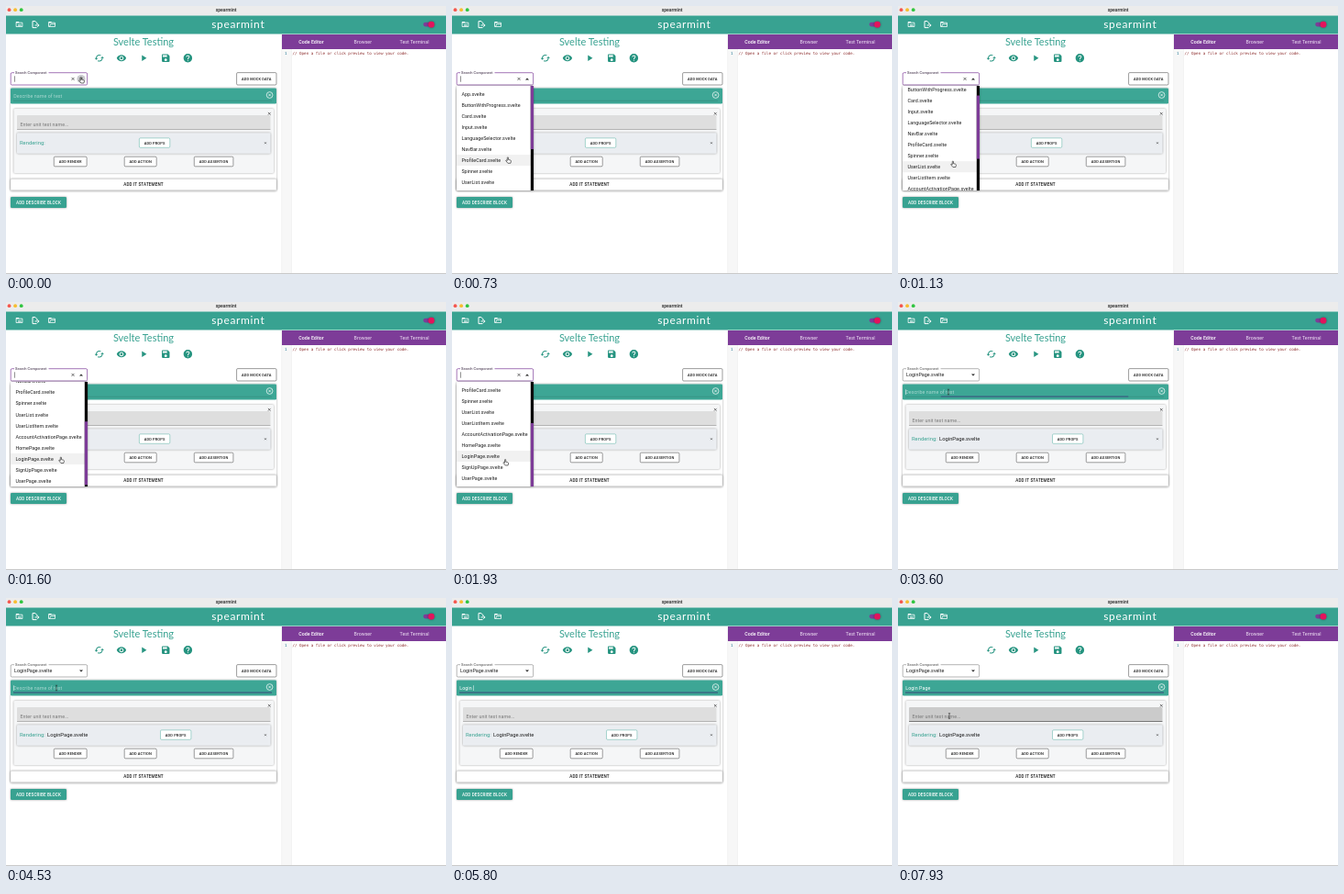
These frames come from a looping animation (480 px wide and 292 px high, 8000 ms). An HTML page:

```html
<!DOCTYPE html>
<html lang="en">
<head>
<meta charset="utf-8">
<title>Test builder</title>
<style>
html, body { margin: 0; width: 100%; height: 100%; overflow: hidden; background: #fff; }
svg { display: block; width: 100vw; height: 100vh; }
text { font-family: Roboto, sans-serif; white-space: pre; }
.body { font-size: 5.33px; letter-spacing: .05px; }
.btn { font-weight: 500; letter-spacing: .0286em; text-anchor: middle; }
.brand { font-family: Lato, sans-serif; }
.tab { font-size: 5.3px; text-anchor: middle; fill: #f1e4f6; }
.code { font-family: "DejaVu Sans Mono", "Liberation Mono", monospace; font-size: 4.24px; }
.shadow { filter: drop-shadow(0 .7px .9px rgba(0,0,0,.38)); }
</style>
</head>
<body>
<svg id="stage" viewBox="0 0 480 292" preserveAspectRatio="none">
  <defs>
    <clipPath id="listClip"><rect x="5" y="87" width="81" height="114"/></clipPath>
  </defs>
  <rect width="480" height="292" fill="#fff"/>
</svg>
<script>
const LOOP = 8000, ROW = 12.05, THUMB = 69, MAX_SCROLL = 6 * ROW;
const TEAL = '#38a291', PURPLE = '#7d3c98', INK = '#1c1c1c';
const stage = document.getElementById('stage');

function add(tag, attrs, parent = stage) {
  const node = document.createElementNS('http://www.w3.org/2000/svg', tag);
  set(node, attrs);
  parent.appendChild(node);
  return node;
}
function set(node, attrs) {
  for (const key in attrs) node.setAttribute(key, attrs[key]);
}
function show(node, on) { node.setAttribute('visibility', on ? 'visible' : 'hidden'); }
function box(x, y, w, h, fill, more = {}, parent) {
  return add('rect', { x, y, width: w, height: h, fill, ...more }, parent);
}
function label(x, y, str, more = {}, parent) {
  const node = add('text', { x, y, fill: INK, ...more }, parent);
  node.textContent = str;
  return node;
}
function line(d, stroke, width, more = {}, parent) {
  return add('path', { d, stroke, 'stroke-width': width, fill: 'none', ...more }, parent);
}
function icon(cx, cy, scale, d, fill, parent) {
  return add('path', { d, fill, transform: `translate(${cx} ${cy}) scale(${scale}) translate(-12 -12)` }, parent);
}
function cross(cx, cy, r, stroke, width, parent) {
  return line(`M${cx - r} ${cy - r}l${2 * r} ${2 * r}m0 ${-2 * r}l${-2 * r} ${2 * r}`, stroke, width, {}, parent);
}
function button(x, y, w, h, str, size = 4, stroke = '#222', parent) {
  box(x, y, w, h, '#fff', { rx: 1.2, stroke, 'stroke-width': .45 }, parent);
  label(x + w / 2, y + h / 2 + size * .36, str, { class: 'btn', 'font-size': size }, parent);
}

// window chrome
box(0, 0, 480, 10.5, '#ececec');
['#f4574f', '#f7bd2f', '#2fc53f'].forEach((c, i) =>
  add('circle', { cx: 3.5 + 6.6 * i, cy: 4.2, r: 1.9, fill: c }));
label(240, 6.2, 'spearmint', { 'font-size': 5, 'font-weight': 700, 'text-anchor': 'middle', fill: '#3c3c3c' });
box(0, 10.5, 480, 20, TEAL);
label(253.3, 24, 'spearmint', { class: 'brand', 'font-size': 12, 'letter-spacing': .65, 'text-anchor': 'middle', fill: '#fff' });

// header icons
const FOLDER = 'M20 6h-8l-2-2H4c-1.1 0-1.99.9-1.99 2L2 18c0 1.1.9 2 2 2h16c1.1 0 2-.9 2-2V8c0-1.1-.9-2-2-2zm0 12H4V8h16v10z';
icon(14.5, 20, .38, FOLDER, '#fff');
line('M13 20.3h3.6M13 21.7h3.6', '#fff', .7);
line('M33.5 23.6h-4.5v-7h3l1.7 1.8v1.4', '#fff', 1);
line('M31.5 21h4.4m-1.6-1.7l1.8 1.7l-1.8 1.7', '#fff', .9);
icon(50, 20, .38, FOLDER, '#fff');
line('M47.5 22.6l1.2-2.8h5', '#fff', .8);
box(455.2, 17.7, 11.5, 4.8, PURPLE, { rx: 2.4 });
add('circle', { cx: 464, cy: 20.2, r: 3.4, fill: '#e3135c', class: 'shadow' });

// right panel
box(300.7, 30.5, .6, 261.5, '#dcdcdc');
box(301, 31, 179, 16, PURPLE);
label(333, 41, 'Code Editor', { class: 'tab', style: 'fill:#fff;font-weight:500' });
label(389.3, 41, 'Browser', { class: 'tab' });
label(445.5, 41, 'Test Terminal', { class: 'tab' });
box(301.3, 47, 10, 244, '#f7f7f7');
box(311, 47, .4, 244, '#e2e2e2');
label(304, 53, '1', { class: 'code', fill: '#237893' });
label(312.4, 53, '// Open a file or click preview to view your code.', { class: 'code', fill: '#8b2a2a' });

// left panel heading and tools
label(150, 42.5, 'Svelte Testing', { class: 'brand', 'font-size': 11, 'text-anchor': 'middle', fill: TEAL });
[
  'M19 8l-4 4h3c0 3.31-2.69 6-6 6-1.01 0-1.97-.25-2.8-.7l-1.46 1.46C8.97 19.54 10.43 20 12 20c4.42 0 8-3.58 8-8h3l-4-4zM6 12c0-3.31 2.69-6 6-6 1.01 0 1.97.25 2.8.7l1.46-1.46C15.03 4.46 13.57 4 12 4c-4.42 0-8 3.58-8 8H1l4 4 4-4H6z',
  'M12 4.5C7 4.5 2.73 7.61 1 12c1.73 4.39 6 7.5 11 7.5s9.27-3.11 11-7.5c-1.73-4.39-6-7.5-11-7.5zM12 17c-2.76 0-5-2.24-5-5s2.24-5 5-5 5 2.24 5 5-2.24 5-5 5zm0-8c-1.66 0-3 1.34-3 3s1.34 3 3 3 3-1.34 3-3-1.34-3-3-3z',
  'M8 5v14l11-7z',
  'M17 3H5c-1.11 0-2 .9-2 2v14c0 1.1.89 2 2 2h14c1.1 0 2-.9 2-2V7l-4-4zm-5 16c-1.66 0-3-1.34-3-3s1.34-3 3-3 3 1.34 3 3-1.34 3-3 3zm3-10H5V5h10v4z',
  'M12 2C6.48 2 2 6.48 2 12s4.48 10 10 10 10-4.48 10-10S17.52 2 12 2zm1 17h-2v-2h2v2zm2.07-7.75l-.9.92C13.45 12.9 13 13.5 13 15h-2v-.5c0-1.1.45-2.1 1.17-2.83l1.24-1.26c.37-.36.59-.86.59-1.41 0-1.1-.9-2-2-2s-2 .9-2 2H8c0-2.21 1.79-4 4-4s4 1.79 4 4c0 .88-.36 1.68-.93 2.25z'
].forEach((d, i) => icon(101.8 + 24.15 * i, 56.8, .47, d, '#269480'));

// component search
const searchBox = box(5.2, 72.7, 83.4, 13.3, '#fff', { rx: 1.3 });
box(9, 71.5, 37.5, 2.5, '#fff');
const searchLabel = label(10, 74, 'Search Component', { 'font-size': 4, 'letter-spacing': .035 });
const picked = label(9, 81.3, 'LoginPage.svelte', { class: 'body' });
const searchCaret = box(9, 76.3, .5, 6.4, '#222');
const clear = cross(73, 79.4, 1.5, '#333', .7);
const ripple = add('circle', { cx: 82, cy: 79.5, r: 4.6, fill: '#c9c9cd' });
const arrow = add('path', { d: 'M-2-.9h4l-2 2z', fill: '#222' });
button(251.6, 72.6, 43.4, 13.4, 'ADD MOCK DATA');

// describe block
box(5, 89.5, 290, 112, '#fff', { rx: 1.3, class: 'shadow' });
box(5, 89.5, 290, 17, '#3da695', { rx: 1.3 });
const hint = label(8.3, 99.8, 'Describe name of test', { class: 'body', fill: '#fff', 'fill-opacity': .55 });
const typed = label(8.3, 99.8, '', { class: 'body', fill: '#fff' });
const typeCaret = box(8.3, 95.2, .5, 5.8, '#fff');
box(8, 102.9, 282, .4, '#2b786c');
const underline = box(8, 102.6, 282, .8, '#3c3f7d');
add('circle', { cx: 287.6, cy: 97, r: 3.4, fill: 'none', stroke: '#fff', 'stroke-width': .7 });
cross(287.6, 97, 1.3, '#fff', .7);

// test card
box(8.5, 112, 283.5, 70, '#f5f6f7', { rx: 1.3, class: 'shadow' });
cross(287.3, 117.3, 1.4, '#222', .6);
const field = box(12, 119, 276.5, 16, '#dedede', { rx: 1 });
const fieldLine = box(12, 134.5, 276.5, .5, '#888');
label(15.5, 131.4, 'Enter unit test name...', { class: 'body', fill: '#777' });
box(12, 138.3, 276.5, 22.5, '#eff2f6', { rx: 1.3, class: 'shadow', 'fill-opacity': .95 });
label(15, 151.2, 'Rendering:', { 'font-size': 5.83, fill: TEAL });
const rendered = label(45, 151.2, 'LoginPage.svelte', { 'font-size': 5.83 });
const props = add('g', {});
button(145.4, 143.9, 33.4, 10.4, 'ADD PROPS', 4, '#45a898', props);
cross(283, 149.3, .9, '#333', .6);
button(52.3, 164.2, 35.8, 10.6, 'ADD RENDER');
button(129.2, 164.2, 35, 10.6, 'ADD ACTION');
button(205.3, 164.2, 42.6, 10.6, 'ADD ASSERTION');

box(5, 188.6, 290, 12, '#fff', { rx: 1.2, stroke: '#d2d2d2', 'stroke-width': .4, class: 'shadow' });
label(150, 196.3, 'ADD IT STATEMENT', { class: 'btn', 'font-size': 4.6 });
box(5, 208, 61, 12, TEAL, { rx: 1.3, class: 'shadow' });
label(35.5, 215.7, 'ADD DESCRIBE BLOCK', { class: 'btn', 'font-size': 4.6, fill: '#fff' });
box(0, 291, 480, 1, '#c9c9c9');

// dropdown list
const popup = add('g', {});
box(5, 87, 84, 114, '#fff', { class: 'shadow', rx: .8 }, popup);
const clipped = add('g', { 'clip-path': 'url(#listClip)' }, popup);
const list = add('g', {}, clipped);
const hover = box(5, 0, 81, ROW, '#f1f1f1', {}, list);
('App ButtonWithProgress Card Input LanguageSelector NavBar ProfileCard Spinner UserList ' +
 'UserListItem AccountActivationPage HomePage LoginPage SignUpPage UserPage').split(' ')
  .forEach((name, i) => label(10.4, 97.6 + ROW * i, name + '.svelte', { class: 'body' }, list));
box(85.8, 87, 3.2, 114, '#0a0a0a', {}, popup);
const thumb = box(85.8, 87, 3.2, THUMB, PURPLE, {}, popup);

// mouse pointers, hot spot at the origin
const cursors = {
  hand: add('path', {
    d: 'M-.7 .2q0-.7.6-.7t.6.7v2l2.1.5q.9.3.8 1.2l-.5 2.1h-3l-2-2.5q-.4-.8.3-.9l1.1.7z',
    fill: '#fff', stroke: '#111', 'stroke-width': .6, 'stroke-linejoin': 'round'
  }),
  arrow: add('path', { d: 'M0 0v5l1.2-1.1.8 1.9.9-.4-.8-1.8h1.6z', fill: '#111', stroke: '#fff', 'stroke-width': .4 }),
  beam: line('M-1.1-3q1.1 0 1.1.7v4.6q0 .7-1.1.7M1.1-3q-1.1 0-1.1.7m0 4.6q0 .7 1.1.7', '#222', .6)
};

const OPEN = 300, PICK = 2870, FOCUS = 3470;
const PATH = [[270, 82, 78], [800, 60, 169.5], [1700, 60, 169.5], [1930, 58.2, 172], [2530, 53, 169.6],
  [2900, 53, 169.6], [3500, 55, 98], [7470, 55, 98], [7900, 56, 128.5]];
const KEYS = [5070, 5270, 5470, 5600, 5730, 5800, 6000, 6670, 7000, 7200];

function ease(t, a, b) {
  const u = Math.min(1, Math.max(0, (t - a) / (b - a)));
  return u * u * (3 - 2 * u);
}
function pointer(t) {
  let [, x, y] = PATH[0];
  for (let i = 1; i < PATH.length; i++) {
    const u = ease(t, PATH[i - 1][0], PATH[i][0]);
    x += (PATH[i][1] - PATH[i - 1][1]) * u;
    y += (PATH[i][2] - PATH[i - 1][2]) * u;
  }
  return [x, y];
}

function draw(t) {
  const open = t >= OPEN && t < PICK, chosen = t >= PICK, focused = t < FOCUS;
  const [x, y] = pointer(t);

  set(searchBox, focused ? { stroke: PURPLE, 'stroke-width': .7 } : { stroke: '#444', 'stroke-width': .4 });
  set(searchLabel, { fill: focused ? '#33203c' : '#444' });
  show(picked, chosen);
  show(searchCaret, !chosen && (t < 270 || Math.floor(t / 500) % 2 === 1));
  show(clear, focused);
  show(ripple, t < 420);
  set(arrow, { transform: `translate(82 79.5) scale(1 ${open ? -1 : 1})` });

  const scroll = MAX_SCROLL * ease(t, 870, 1700);
  show(popup, open);
  set(list, { transform: `translate(0 ${-scroll})` });
  set(thumb, { y: 87 + scroll * (114 - THUMB) / MAX_SCROLL });
  const row = Math.floor((y + scroll - 89.7) / ROW);
  set(hover, { y: 89.7 + row * ROW, visibility: open && row >= 0 ? 'inherit' : 'hidden' });

  show(rendered, chosen);
  set(props, { transform: `translate(${chosen ? 23.1 : 0} 0)` });

  const count = KEYS.filter(k => t >= k).length;
  typed.textContent = 'Login Page'.slice(0, count);
  show(hint, count === 0);
  const grow = ease(t, FOCUS, FOCUS + 200);
  set(underline, { x: 149 - 141 * grow, width: 282 * grow });
  const caretOn = count
    ? (t - KEYS[count - 1]) % 1000 < 500
    : t >= FOCUS && (t < 4070 || (t >= 4530 && t < 5000));
  set(typeCaret, { x: 8.4 + (count ? typed.getComputedTextLength() : 0) });
  show(typeCaret, caretOn);

  const inField = y > 119 && y < 135 && t > 7470;
  set(field, { fill: inField ? '#cbcbcb' : '#dedede' });
  set(fieldLine, { fill: inField ? '#222' : '#888' });

  const inHeader = chosen && y > 90 && y < 106;
  const kind = inField || inHeader ? 'beam' : t < 3000 || y > 164 ? 'hand' : 'arrow';
  const visible = t < KEYS[0] || t >= 7470;
  for (const name in cursors) {
    show(cursors[name], visible && name === kind);
    set(cursors[name], { transform: `translate(${x} ${y})` });
  }
}

function tick() {
  draw(performance.now() % LOOP);
  requestAnimationFrame(tick);
}
tick();
</script>
</body>
</html>
```
